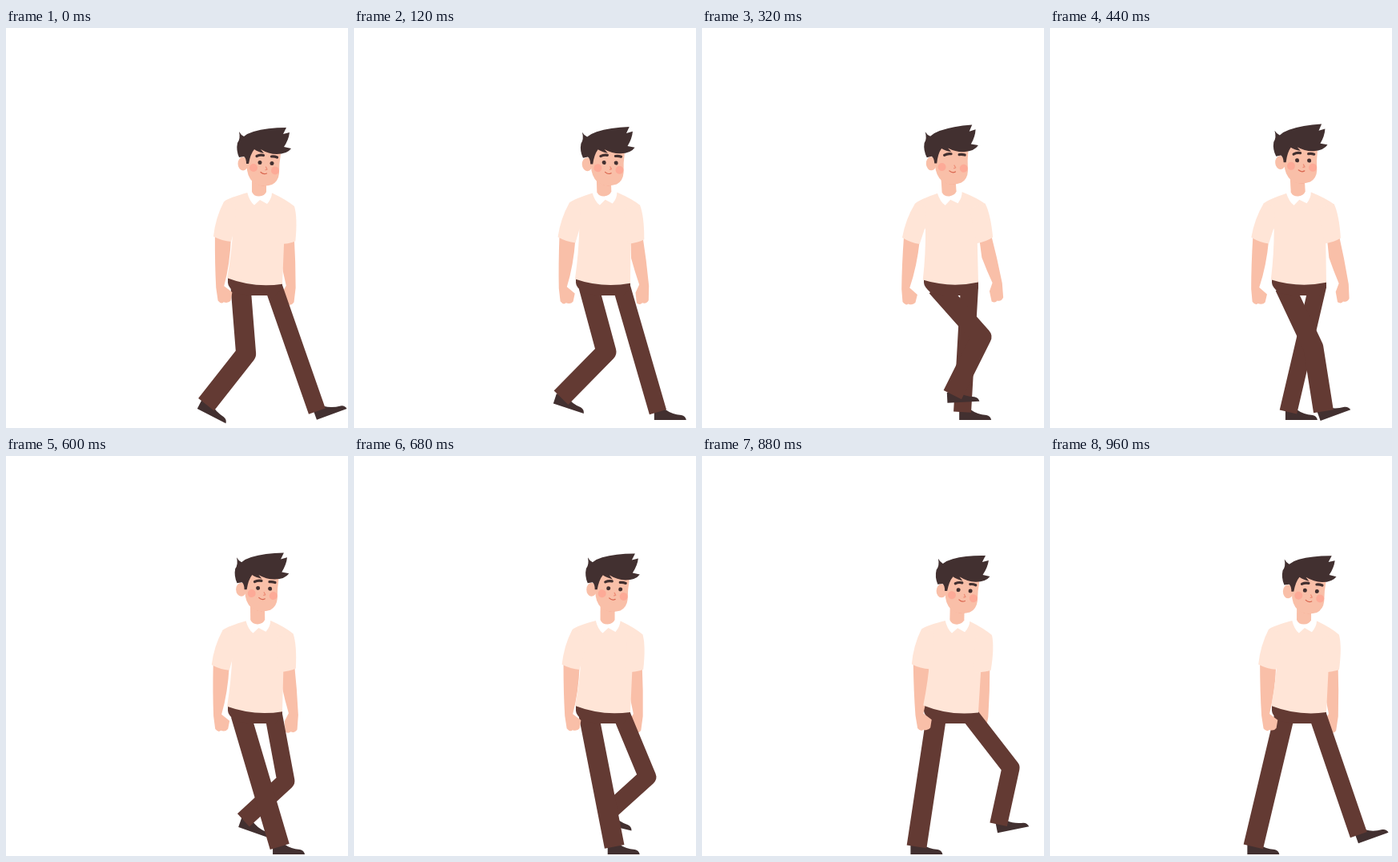
Write an HTML page with a canvas that moves like this. It is 427 px wide and 498 px high and loops after 1 s.

```html
<!DOCTYPE html>
<html lang="en">
<head>
<meta charset="utf-8">
<title>Walk cycle</title>
<style>
html, body { margin: 0; width: 100%; height: 100%; overflow: hidden; background: #fff; }
canvas { display: block; }
</style>
</head>
<body>
<canvas id="stage" width="427" height="498"></canvas>
<script>
const ctx = document.getElementById('stage').getContext('2d');
const LOOP = 1000, STEP = 40;
const SKIN = '#f9bfa8', SHIRT = '#ffe5d7', PANTS = '#633a33', DARK = '#423030';
const LEAN = .044, SWING = .088;

// Both legs walk the same cycle, half a loop apart
const nearLeg = { hipX: 293, thigh: 84, shin: 78, width: 25, heel: -8, phase: 0 };
const farLeg = { hipX: 334, thigh: 84, shin: 70, width: 22, heel: -4, phase: .5 };
const HIP_Y = 322;

// Phase, lift of the ankle, foot angle in degrees
const STEPS = [
  [0, 17, 27], [.2, 31, 12], [.3, 33, 0], [.44, 9, -20],
  [.5, 1, -20], [.58, 0, 0], [.96, 0, 0], [1, 17, 27]
];

const wave = (t, peak) => Math.cos(2 * Math.PI * (t - peak));

function fill(color, d) {
  ctx.fillStyle = color;
  ctx.fill(new Path2D(d));
}

function stroke(color, width, d) {
  ctx.strokeStyle = color;
  ctx.lineWidth = width;
  ctx.stroke(new Path2D(d));
}

function oval(color, x, y, rx, ry = rx) {
  ctx.fillStyle = color;
  ctx.beginPath();
  ctx.ellipse(x, y, rx, ry, 0, 0, 2 * Math.PI);
  ctx.fill();
}

function turn(x, y, angle, paint) {
  ctx.save();
  ctx.translate(x, y);
  ctx.rotate(angle);
  ctx.translate(-x, -y);
  paint();
  ctx.restore();
}

function footStep(p) {
  const i = STEPS.findIndex(s => s[0] > p);
  const a = STEPS[i - 1], b = STEPS[i], u = (p - a[0]) / (b[0] - a[0]);
  return [1, 2].map(c => a[c] + (b[c] - a[c]) * u);
}

function drawLeg({ hipX, thigh, shin, width, heel, phase }, t) {
  const p = (t + phase) % 1;
  const [lift, angle] = footStep(p);
  const dx = 6 + 48 * wave(p, .52), dy = thigh + shin - lift;
  const ax = hipX + dx, ay = HIP_Y + dy;

  // The knee bends forward, and stays straight when the ankle is out of reach
  const reach = Math.hypot(dx, dy), ux = dx / reach, uy = dy / reach;
  const along = (thigh ** 2 - shin ** 2 + reach ** 2) / (2 * reach);
  const bend = Math.sqrt(Math.max(0, thigh ** 2 - along ** 2));
  const kx = hipX + along * ux + bend * uy, ky = HIP_Y + along * uy - bend * ux;

  turn(ax, ay, angle * Math.PI / 180, () => {
    ctx.translate(ax + heel, ay);
    fill(DARK, 'M0 -1 L14 -1 Q22 5 34 6 Q39 7 40 12 L0 12Z');
  });
  ctx.lineCap = 'butt';
  stroke(PANTS, width, `M${hipX} ${HIP_Y} L${kx} ${ky} L${ax + (ax - kx) * .03} ${ay + (ay - ky) * .03}`);
}

function drawFarArm() {
  fill(SKIN, 'M345 260 L345 287 Q349 304 354 320 L349 330 L350 343 Q354 346 357 343 Q362 345 365 340 L366 322 Q364 290 360 258Z');
}

function drawNearArm() {
  fill(SKIN, 'M258 258 Q257 295 258 324 L260 340 Q264 345 267 342 Q273 344 276 340 L278 330 L268 322 Q276 295 278 262Z');
}

function drawShirt(swing) {
  fill(SHIRT, 'M300 205 Q276 212 270 217 L282 250 Q281 280 276 312 Q310 324 345 318 L346 268 L358 221 Q348 213 330 205Z');
  turn(273, 220, -swing, () => fill(SHIRT, 'M270 217 Q259 237 256 260 Q267 266 278 267 L284 246 L284 220Z'));
  turn(352, 222, swing, () => fill(SHIRT, 'M338 225 L341 269 Q354 268 362 264 Q363 235 358 221Z'));
}

function drawNeck() {
  fill('#fff', 'M301 204 Q304 216 310 220.5 L317 214 L326 219 Q332 212 332 205 L326 200 L306 200Z');
  fill(SKIN, 'M307 186 L307 204 Q309 209.5 316 209.5 Q323 209 325 204 L325 188Z');
}

function drawHead(open) {
  fill('#f3977f', 'M308 190 Q315 198 325 196 L325 190Z');
  oval(SKIN, 296, 169, 6.5, 8.5);
  fill(SKIN, 'M300 150 L301 177 Q303 190 313 195 Q322 198 332 195 Q340 191 341 181 Q341 168 343 157 L330 145Z');
  oval('#fdaa97', 309, 174, 5);
  oval('#fdaa97', 336, 177.5, 5);
  if (open > 0) {
    oval(DARK, 317, 167.5, 2.5, 2.5 * open);
    oval(DARK, 332, 168.5, 2.5, 2.5 * open);
  }
  ctx.lineCap = 'round';
  stroke(DARK, 3.2, 'M313 159.5 Q317 157.5 321.5 158.5 M331.5 160 Q335 159.5 338.5 161');
  stroke('#ee8f78', 1.3, 'M324.5 173 L326 176 L324 176.5');
  stroke('#d9664f', 1.2, 'M318 179.5 Q321.5 183 325.5 181');
  fill(DARK, 'M291 129 Q293 133 297 135 Q302 131 309 129 Q326 124 350 124 L346 132 L354 130 Q353 139 347 148 L356 150 Q351 157 338 157 Q328 157 318 151 L322 156 Q314 154 310 151 Q305 157 303 169 L300 169 Q300 162 297 160 L291 161 Q287 152 289 143 Q293 138 291 129Z');
}

function draw(t) {
  const sway = wave(t, .83), swing = SWING * sway;
  const lean = (offset, paint) => turn(311, 318, LEAN * (sway - offset), paint);
  ctx.fillStyle = '#fff';
  ctx.fillRect(0, 0, 427, 498);
  ctx.lineJoin = 'round';

  lean(0, () => turn(352, 222, swing, drawFarArm));
  drawLeg(farLeg, t);
  drawLeg(nearLeg, t);
  fill(PANTS, 'M277 310 L345 315 L345 324 L336 333 L303 333 L286 330 Q277 322 277 317Z');
  lean(0, () => {
    turn(273, 220, -swing, drawNearArm);
    drawShirt(swing);
  });
  lean(.48, () => {
    drawNeck();
    ctx.translate(0, 1.6 * (wave(t, .07) - .9));
    drawHead(Math.min(1, (Math.abs(t - .28) - .04) / .1));
  });
}

function frame() {
  const ms = performance.now() % LOOP;
  draw(Math.floor(ms / STEP) * STEP / LOOP);
  requestAnimationFrame(frame);
}
frame();
</script>
</body>
</html>
```
